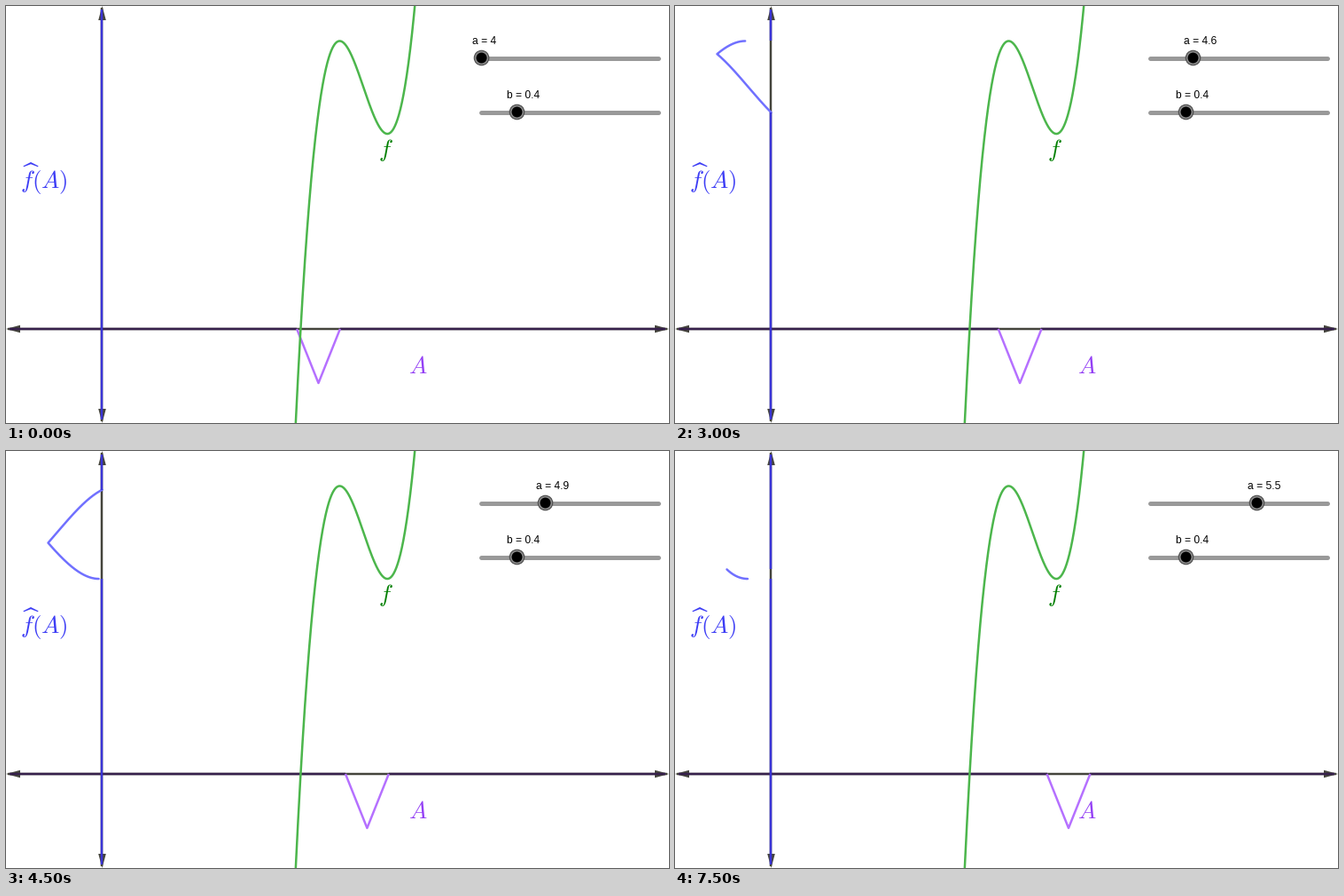
A matplotlib script for the animation above (8000 ms loop, 748 px wide and 470 px high).

```python
import matplotlib.pyplot as plt
import numpy as np
from matplotlib.animation import FuncAnimation
from matplotlib.patches import Circle, Polygon

W, H, DPI = 748, 470, 100
PX = 72 / DPI                   # points per pixel
OX, OY, UNIT = 108.5, 364, 61   # graph origin and scale in pixels
ROOTS = (4, 5, 5.5)
E1 = sum(ROOTS)
E2 = 4 * 5 + 4 * 5.5 + 5 * 5.5
SPREAD = np.sqrt(E1 ** 2 - 3 * E2)
X_MAX, X_MIN = (E1 - SPREAD) / 3, (E1 + SPREAD) / 3   # turning points of f
B = 0.4

AXIS, GREEN, BLUE, PURPLE = "#44443c", "#4cb64c", "#7070ff", "#b570ff"
AXIS_BLUE, AXIS_PURPLE = "#3a34d6", "#36204c"

plt.rcParams["mathtext.fontset"] = "cm"
plt.rcParams["font.family"] = "Liberation Sans"


def f(x):
    return 5 * (x - 4) * (x - 5) * (x - 5.5) + 4


def px(x):
    return OX + UNIT * x


def py(y):
    return OY - UNIT * y


def member(x, a):
    """Triangular fuzzy number centred on a."""
    return np.maximum(0, 1 - np.abs(x - a) / B)


def image(a):
    """Pixel path of the fuzzy image over the falling branch of f."""
    lo, hi = max(X_MAX, a - B), min(X_MIN, a + B)
    if hi - lo < 0.02:
        return np.array([]), np.array([])
    x = np.union1d(np.linspace(lo, hi, 200), np.clip(a, lo, hi))
    # the other two solutions of f(t) = f(x)
    s = E1 - x
    d = np.sqrt(np.maximum(0, s ** 2 - 4 * (x ** 2 - E1 * x + E2)))
    mu = np.max([member(t, a) for t in (x, (s - d) / 2, (s + d) / 2)], axis=0)
    return px(-mu), py(f(x))


fig = plt.figure(figsize=(W / DPI, H / DPI), dpi=DPI, facecolor="white")
ax = fig.add_axes([0, 0, 1, 1])
ax.set_xlim(0, W)
ax.set_ylim(H, 0)
ax.axis("off")


def line(xs, ys, color, z, width=2.5, cap="butt"):
    return ax.plot(xs, ys, color=color, lw=width * PX, zorder=z,
                   solid_capstyle=cap, solid_joinstyle="round")[0]


def label(x, y, s, color, size):
    return ax.text(x, y, s, color=color, fontsize=size * PX,
                   va="baseline", ha="left", zorder=9)


def arrow(x, y, dx, dy):
    """Arrow head with its tip at (x, y), pointing along (dx, dy)."""
    bx, by = x - 16 * dx, y - 16 * dy
    pts = [(x, y), (bx - 4.3 * dy, by + 4.3 * dx), (bx + 4.3 * dy, by - 4.3 * dx)]
    ax.add_patch(Polygon(pts, fc=AXIS, ec="none", zorder=2))


def slider(y):
    line([536.5, 736.5], [y, y], "#999999", 5, 5, "round")


def knob(x, y):
    ring = Circle((x, y), 8.2, fc="#8c8c8c", ec="#505050", lw=1.2 * PX, zorder=6)
    dot = Circle((x, y), 6, fc="black", ec="none", zorder=7)
    return ax.add_patch(ring), ax.add_patch(dot)


# axes
line([2, W - 2], [OY, OY], AXIS, 1)
line([OX, OX], [2, H - 2], AXIS, 1)
arrow(0, OY, -1, 0)
arrow(W, OY, 1, 0)
arrow(OX, 0, 0, -1)
arrow(OX, H, 0, 1)

# function and captions
xs = np.linspace(3.5, 5.85, 500)
line(px(xs), py(f(xs)), GREEN, 4)
label(420, 170, "$f$", "#007f00", 27)
label(454, 414.5, "$A$", "#9440f5", 27)
label(16, 205.5, "$f(A)$", "#3c3cf5", 27)
ax.add_patch(Polygon([(19.5, 180.3), (28, 176), (36.5, 180.3), (36, 181.3),
                      (28, 178.2), (20, 181.3)], fc="#3c3cf5", ec="none", zorder=9))

# sliders
slider(58.5)
slider(119.5)
knob(576.5, 119.5)
label(565, 104, "b = 0.4", "black", 12)
knob_a = knob(536.5, 58.5)
text_a = label(526, 43, "", "black", 12)

# moving graphs
left = line([], [], AXIS_PURPLE, 3)
right = line([], [], AXIS_PURPLE, 3)
tent = line([], [], PURPLE, 3)
above = line([], [], AXIS_BLUE, 5)
below = line([], [], AXIS_BLUE, 5)
curve = line([], [], BLUE, 4, cap="round")


def update(i):
    a = 4 + i / 10
    x = 536.5 + 80 * (a - 4)
    for c in knob_a:
        c.center = (x, 58.5)
    text_a.set_x(x - 10.5)
    text_a.set_text(f"a = {a:.2g}")

    x0, x1 = px(a - B), px(a + B)
    left.set_data([4, x0], [OY, OY])
    right.set_data([x1, W - 4], [OY, OY])
    tent.set_data([x0, px(a), x1], [OY, OY + UNIT, OY])

    cx, cy = image(a)
    curve.set_data(cx, cy)
    top, bottom = (cy[0], cy[-1]) if len(cy) else (OY, OY)
    above.set_data([OX, OX], [4, top])
    below.set_data([OX, OX], [bottom, H - 4])
    return [*knob_a, text_a, left, right, tent, curve, above, below]


anim = FuncAnimation(fig, update, frames=16, interval=500, repeat=True,
                     repeat_delay=0, blit=False)
plt.show()
```
